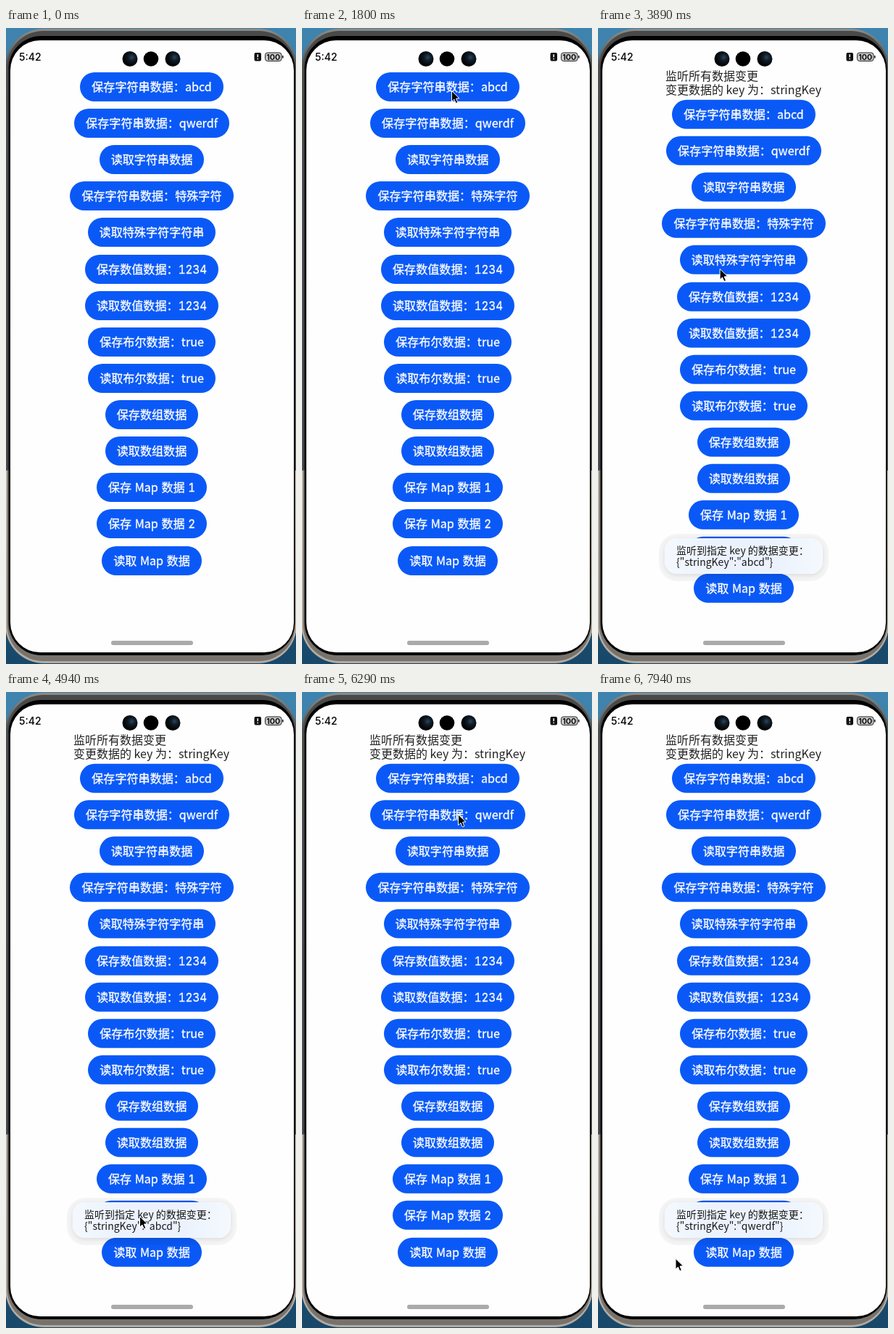
Recreate the animation shown at these times as an HTML page. Size 400x875 px, loop 8000 ms.

```html
<!DOCTYPE html>
<html lang="zh-CN">
<head>
<meta charset="utf-8">
<title>Preferences demo</title>
<style>
html, body { margin: 0; width: 100%; height: 100%; overflow: hidden; background: #17486a; }
body { position: relative; font-family: "Noto Sans CJK SC", "Noto Sans CJK", "Noto Sans", sans-serif; }
svg, #list, #label, #toast, #clock { position: absolute; }
svg { left: 0; top: 0; overflow: visible; }
#clock { left: 18px; top: 29.5px; font: 500 14px/20px Inter, sans-serif; color: #000; }
#list {
  left: 0; top: 60.8px; width: 402px;
  display: flex; flex-direction: column; align-items: center; gap: 10.15px;
}
.btn {
  height: 40px; padding: 0 16px; border-radius: 20px; background: #0a59f7; color: #fff;
  font-size: 16.1px; line-height: 38.4px; white-space: pre; word-spacing: 1px;
  -webkit-text-stroke: .3px #fff;
}
.btn.down { background: #0b50df; }
.num { font: 15.2px Inter, sans-serif; font-feature-settings: "tnum"; }
#label { left: 93px; top: 56px; font-size: 16px; line-height: 19px; color: #222; white-space: pre; }
#toast {
  left: 92px; top: 702px; width: 202px; height: 49px; padding-left: 16px; border-radius: 17px;
  background: linear-gradient(90deg, #f5f9fe, #ebf2fd 30%, #ebf2fd 70%, #f5f9fe);
  box-shadow: 0 2px 6px rgba(0,0,0,.1), 0 2px 0 8px rgba(0,0,0,.04);
  font-size: 14px; line-height: 16.4px; color: #191919; white-space: pre;
}
#toast.thin { background: rgba(243,247,254,.9); }
#toast div { padding-top: 7.5px; }
</style>
</head>
<body>
<svg width="400" height="875">
  <defs>
    <linearGradient id="sky" x2="0" y2="1">
      <stop offset="0" stop-color="#3f84ae"/>
      <stop offset="1" stop-color="#17486a"/>
    </linearGradient>
    <linearGradient id="edge" x2="0" y2="1">
      <stop offset="0" stop-color="#8e8a85"/>
      <stop offset=".06" stop-color="#4d5256"/>
      <stop offset=".697" stop-color="#4d5256"/>
      <stop offset=".697" stop-color="#c3bbb0"/>
      <stop offset="1" stop-color="#b3aaa0"/>
    </linearGradient>
    <linearGradient id="rim" x2="0" y2="1">
      <stop offset="0" stop-color="#4a4a49"/>
      <stop offset=".697" stop-color="#3d3e40"/>
      <stop offset=".697" stop-color="#77726c"/>
      <stop offset="1" stop-color="#77726c"/>
    </linearGradient>
    <radialGradient id="lens" cx=".62" cy=".4" r=".5">
      <stop offset="0" stop-color="#2c465c"/>
      <stop offset=".45" stop-color="#101c28"/>
      <stop offset="1" stop-color="#030507"/>
    </radialGradient>
  </defs>
  <rect width="400" height="875" fill="url(#sky)"/>
  <rect x="-1" y="1" width="402" height="873" rx="53" fill="url(#edge)"/>
  <rect x="1.5" y="4" width="397.5" height="867" rx="50" fill="url(#rim)"/>
  <rect x="3.5" y="11" width="395" height="852" rx="45" fill="#000"/>
  <rect x="6" y="17" width="391" height="842" rx="41" fill="#fefefe"/>
  <circle cx="171" cy="42.5" r="10.5" fill="url(#lens)"/>
  <circle cx="200" cy="42.5" r="10.3" fill="#000"/>
  <circle cx="230" cy="42.5" r="10.5" fill="url(#lens)"/>
  <rect x="342.5" y="34" width="9.5" height="11.5" rx="2" fill="#111"/>
  <path d="M347.2 36.3v4M347.2 41.8v1.5" stroke="#fff" stroke-width="1.5"/>
  <rect x="357.5" y="34" width="22.5" height="11.5" rx="3.2" fill="#c9c9c9" stroke="#222"/>
  <path d="M381.8 38v3.6" stroke="#222" stroke-width="1.6"/>
  <text x="368.8" y="43.8" text-anchor="middle" font-family="Inter, sans-serif" font-size="11" font-weight="600">100</text>
  <rect x="145" y="843" width="113" height="6" rx="3" fill="#aaa"/>
</svg>
<div id="clock">5:42</div>
<div id="label">监听所有数据变更
变更数据的 key 为：stringKey</div>
<div id="list"></div>
<div id="toast"><div></div></div>
<svg id="cursor" width="14" height="20">
  <path d="M.5 .5V15.2L3.9 12.1L6.3 17.6L8.9 16.5L6.5 11.1L11 10.7Z" fill="#000" stroke="#fff" stroke-width="1" stroke-linejoin="round"/>
</svg>
<script>
const LOOP = 8000, BEAT = 150;
const $ = id => document.getElementById(id);

const rows = [
  '保存字符串数据：abcd', '保存字符串数据：qwerdf', '读取字符串数据',
  '保存字符串数据：特殊字符', '读取特殊字符字符串',
  '保存数值数据：1234', '读取数值数据：1234',
  '保存布尔数据：true', '读取布尔数据：true',
  '保存数组数据', '读取数组数据',
  '保存 Map 数据 1', '保存 Map 数据 2', '读取 Map 数据'
];
$('list').innerHTML = rows.map(text =>
  `<div class="btn">${text.replace(/\d+/, '<span class="num">$&</span>')}</div>`).join('');
const second = $('list').children[1];

// pointer stops: beat, x, y
const stops = [
  [9, 183, 39], [12, 206, 86], [24, 206, 86], [29, 97, 782], [33, 184, 721],
  [36, 262, 310], [39, 231, 163], [40, 214, 168], [42, 215, 168], [50, 215, 168],
  [52, 128, 853], [53, 106.5, 779]
];
const smooth = u => u * u * (3 - 2 * u);

function pointer(beat) {
  const i = stops.findLastIndex(s => s[0] <= beat);
  const a = stops[i], b = stops[i + 1] || a;
  const u = a === b ? 0 : smooth((beat - a[0]) / (b[0] - a[0]));
  return [1, 2].map(k => a[k] + (b[k] - a[k]) * u);
}
const show = (el, on) => { el.style.visibility = on ? 'visible' : 'hidden'; };

function draw(t) {
  const beat = Math.floor((t + 10) / BEAT);
  const changed = beat >= 19, moved = beat >= 9;

  show($('cursor'), moved);
  if (moved) {
    const [x, y] = pointer(beat);
    $('cursor').style.transform = `translate(${x}px,${y}px)`;
  }
  show($('label'), changed);
  $('list').style.transform = changed ? 'translateY(37.8px)' : '';
  second.classList.toggle('down', beat === 47);

  show($('toast'), changed && (beat < 40 || beat >= 48));
  $('toast').className = beat === 19 ? 'thin' : '';
  const value = beat < 40 ? 'abcd' : 'qwerdf';
  $('toast').firstChild.textContent = `监听到指定 key 的数据变更：\n{"stringKey":"${value}"}`;
}

const start = performance.now();
function tick() {
  draw((performance.now() - start) % LOOP);
  requestAnimationFrame(tick);
}
tick();
</script>
</body>
</html>
```
